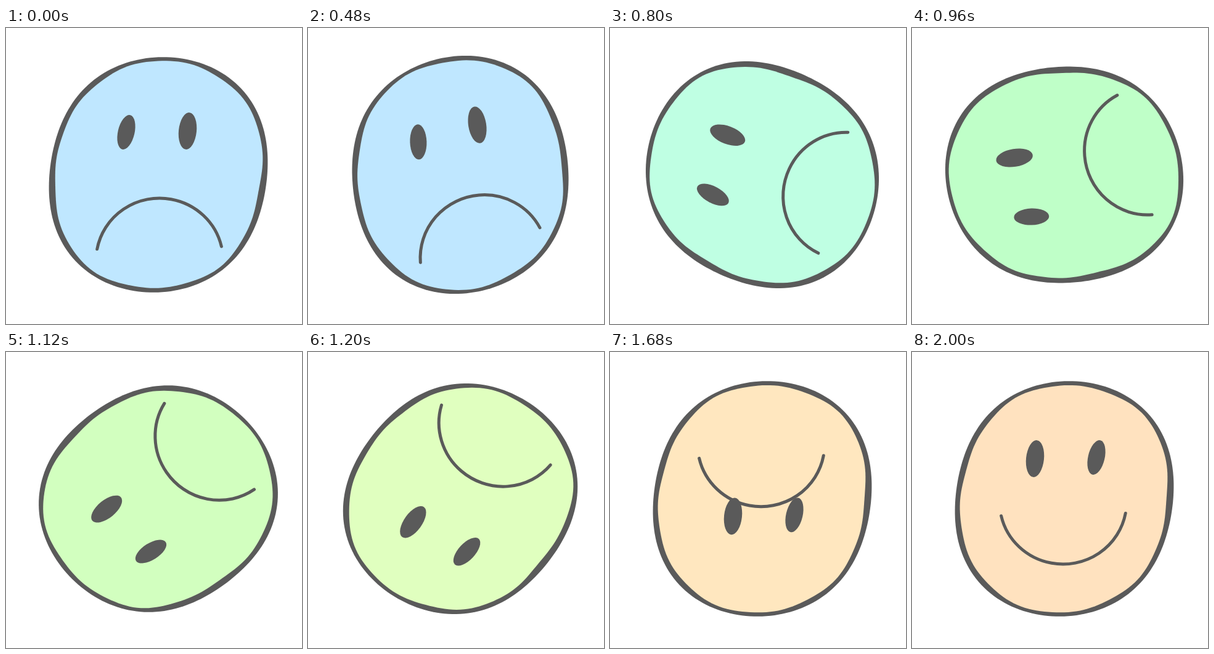
An HTML page with a canvas for the animation above (2960 ms loop, 480x480 px).

```html
<!DOCTYPE html>
<html lang="en">
<head>
<meta charset="utf-8">
<title>Turning mood</title>
<style>
  html, body { margin: 0; width: 100%; height: 100%; overflow: hidden; background: #fff; }
  canvas { display: block; width: 100vw; height: 100vh; }
</style>
</head>
<body>
<canvas id="stage" width="480" height="480"></canvas>
<script>
const ctx = document.getElementById('stage').getContext('2d');
const SIZE = 480, LOOP = 2960, START = 480, TICK = 80;
const TURN_END = 14, LAST = 20;
const CX = 247, CY = 238, INK = '#5a5a5a';
const RAD = Math.PI / 180;

const eyes = [
  { x: -52, y: -69, rx: 13.5, ry: 28.5, tilt: 13 },
  { x: 47.5, y: -71, rx: 14.5, ry: 30, tilt: 6 }
];
const mouth = { x: 2, y: 139, rx: 103, ry: 101, from: 190.5, to: 347 };

const mix = (a, b, k) => a + (b - a) * k;
const clamp01 = v => Math.max(0, Math.min(1, v));

// A slanted, slightly squared oval.
const rim = a => 186
  + 8.8 * Math.cos(2 * a - 217 * RAD)
  + 2.5 * Math.cos(4 * a - 198 * RAD);

// Uneven pen weight, redrawn with each turning step.
const weight = (a, seed) => 8
  + 1.4 * Math.cos(2 * a)
  + Math.sin(5 * a + 1.7 * seed)
  + 0.6 * Math.sin(11 * a - seed);

function blob(radius, color) {
  ctx.beginPath();
  for (let deg = 0; deg < 360; deg += 2) {
    const a = deg * RAD, r = radius(a);
    ctx.lineTo(r * Math.cos(a), r * Math.sin(a));
  }
  ctx.closePath();
  ctx.fillStyle = color;
  ctx.fill();
}

function drawMouth(dy) {
  const { x, y, rx, ry, from, to } = mouth;
  ctx.beginPath();
  ctx.ellipse(x, y + dy, rx, ry, 0, from * RAD, to * RAD);
  ctx.strokeStyle = INK;
  ctx.lineWidth = 5;
  ctx.lineCap = 'round';
  ctx.stroke();
}

function drawEye({ x, y, rx, ry, tilt }, dy) {
  ctx.beginPath();
  ctx.ellipse(x, y + dy, rx, ry, tilt * RAD, 0, 2 * Math.PI);
  ctx.fillStyle = INK;
  ctx.fill();
}

// The face turns upside down, then eyes and mouth trade places.
function draw(step) {
  const rot = Math.min(180, 15 * step);
  const swap = clamp01((step - TURN_END) / (LAST - TURN_END));
  const slide = 140 * swap;
  const sag = 4 * clamp01((step - 10) / 4);
  const hue = Math.max(mix(40, 33, swap), Math.min(203, 219 - 13 * step));
  const seed = Math.min(step, TURN_END);

  ctx.fillStyle = '#fff';
  ctx.fillRect(0, 0, SIZE, SIZE);
  ctx.save();
  ctx.translate(CX, CY);
  ctx.rotate(-rot * RAD);
  blob(rim, INK);
  blob(a => rim(a) - weight(a, seed), `hsl(${hue}, 100%, 87.5%)`);
  drawMouth(-slide - sag);
  eyes.forEach(eye => drawEye(eye, slide - sag));
  ctx.restore();
}

const begin = performance.now();
function frame() {
  const t = (performance.now() - begin) % LOOP;
  draw(t < START ? 0 : Math.min(LAST, 1 + Math.floor((t - START) / TICK)));
  requestAnimationFrame(frame);
}
frame();
</script>
</body>
</html>
```
